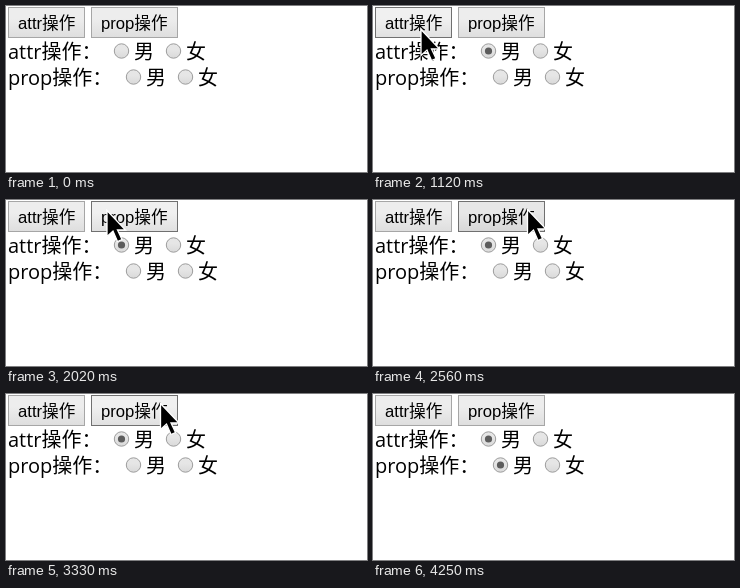
Animation of 361x166 px, one loop 4.63 s. Source, as an HTML page:

```html
<!DOCTYPE html>
<html lang="zh-CN">
<head>
<meta charset="utf-8">
<style>
  html, body { margin: 0; width: 100%; height: 100%; overflow: hidden; background: #fff; }
  svg { display: block; }
  text { font: 20px "Open Sans", "Noto Sans CJK SC", "Noto Sans CJK", sans-serif; }
  .button text { font: 16.67px "Liberation Sans", "Noto Sans CJK SC", "Noto Sans CJK", sans-serif; }
  text .han { font-weight: 350; }
  .button rect { fill: url(#normal); stroke: #a6a6a6; }
  .button.hover rect { fill: url(#hover); stroke: #707070; }
  .button.pressed rect { fill: url(#pressed); }
  .ring { fill: url(#radio); stroke: #9c9c9c; }
  .dot { fill: #5c5c5c; visibility: hidden; }
</style>
</head>
<body>
<svg id="stage" width="361" height="166" viewBox="0 0 361 166">
  <defs>
    <linearGradient id="normal" x2="0" y2="1"><stop offset=".38" stop-color="#ededed"/><stop offset="1" stop-color="#dedede"/></linearGradient>
    <linearGradient id="hover" x2="0" y2="1"><stop offset=".38" stop-color="#f0f0f0"/><stop offset="1" stop-color="#e0e0e0"/></linearGradient>
    <linearGradient id="pressed" x2="0" y2="1"><stop offset=".38" stop-color="#e7e7e7"/><stop offset="1" stop-color="#d7d7d7"/></linearGradient>
    <linearGradient id="radio" x2="0" y2="1"><stop offset=".38" stop-color="#e6e6e6"/><stop offset="1" stop-color="#d9d9d9"/></linearGradient>
  </defs>
  <g id="page"></g>
  <path id="cursor" d="M0 0V26L6 20.5L10.5 31L15 29L10.5 19.5H18.5Z" stroke="#fff" stroke-width="1.3"/>
</svg>
<script>
const LOOP = 4630;
const page = document.getElementById('page');
const cursor = document.getElementById('cursor');

const han = text => `<tspan class="han">${text}</tspan>`;

const button = (x, width, name) => `<g class="button">
  <rect x="${x + .5}" y="1.5" width="${width - 1}" height="30"/>
  <text x="${x + 10}" y="23">${name}${han('操作')}</text></g>`;

const radio = (x, y, label) => `<circle class="ring" cx="${x}" cy="${y}" r="7.2"/>
  <circle class="dot" cx="${x}" cy="${y}" r="3.6"/>
  <text x="${x + 12.5}" y="${y + 8}">${han(label)}</text>`;

const row = (y, name, x) => `<text x="2" y="${y + 8}">${name}${han('操作：')}</text>`
  + radio(x, y, '男') + radio(x + 52, y, '女');

page.innerHTML = button(2, 77, 'attr') + button(85, 87, 'prop')
  + row(45, 'attr', 115.5) + row(71, 'prop', 127.5);

const buttons = page.querySelectorAll('.button');
const dots = page.querySelectorAll('.dot');

// Mouse down and mouse up times
const attrClicks = [[1020, 1090], [1170, 1250], [1330, 1400], [1480, 1560], [1630, 1710]];
const propClicks = [[2480, 2640], [2790, 2860], [3020, 3100], [3250, 3330], [3480, 3560]];

const mix = (a, b, u) => a.map((v, i) => v + (b[i] - v) * u);

// Cursor tip, or null while it is off stage
function cursorAt(t) {
  if (t < 380 || t >= 4250) return null;
  if (t < 2020) {
    const u = Math.min(1, Math.floor((t - 380) / 80) / 6);
    return mix([161, 130], [48, 23.5], 1 - (1 - u) ** 2);
  }
  if (t < 2100) return [101, 10.5];
  if (t < 2250) return [147, 10];
  if (t < 3870) return [154.5, 9.5];
  const u = (Math.floor((t - 3870) / 76) + 1) / 5;
  return mix([154.5, 9.5], [308, 142], u ** 1.5);
}

function draw(t) {
  const tip = cursorAt(t);
  cursor.style.visibility = tip ? 'visible' : 'hidden';
  if (tip) cursor.setAttribute('transform', `translate(${tip})`);

  [attrClicks, propClicks].forEach((clicks, i) => {
    const [left, right] = [[2, 79], [85, 172]][i];
    const over = !!tip && tip[0] >= left && tip[0] < right && tip[1] < 32;
    buttons[i].classList.toggle('hover', over);
    buttons[i].classList.toggle('pressed', clicks.some(([down, up]) => t >= down && t < up));

    // attr sets the choice once, prop toggles it on every click
    const done = clicks.filter(([, up]) => t >= up).length;
    const checked = i ? done % 2 : done;
    dots[i * 2].style.visibility = checked ? 'visible' : 'hidden';
  });
}

const start = performance.now();
function tick() {
  draw((performance.now() - start) % LOOP);
  requestAnimationFrame(tick);
}
tick();
</script>
</body>
</html>
```
